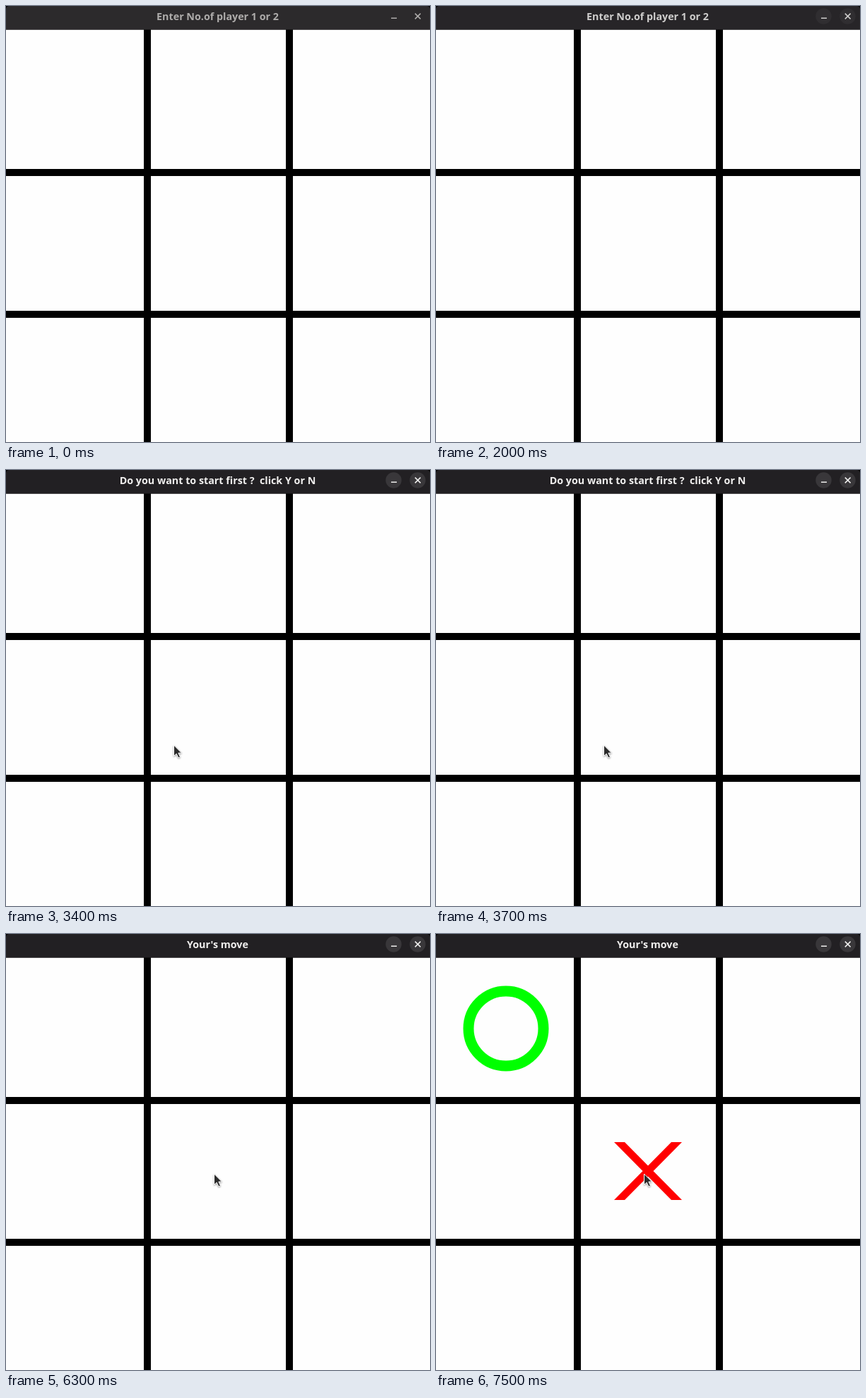
Write an HTML page that moves like this. It is 600 px wide and 618 px high and loops after 8000 ms.

```html
<!DOCTYPE html>
<html lang="en">
<head>
<meta charset="utf-8">
<title>Tic-tac-toe</title>
<style>
  html, body { margin: 0; width: 100%; height: 100%; overflow: hidden; background: #fefefe; }
  svg { display: block; width: 600px; height: 618px; }
  #title { font: bold 14.3px "Open Sans", sans-serif; text-anchor: middle; white-space: pre; }
  #arrow { filter: drop-shadow(.5px 1px 1px #0006); }
</style>
</head>
<body>
<svg viewBox="0 0 600 618">
  <rect width="600" height="618" fill="#fefefe"/>
  <path d="M200 33V618M401 33V618M0 236H600M0 437H600" stroke="#000" stroke-width="10"/>
  <rect width="600" height="33.5"/>
  <path id="bar" d="M0 33.5V5Q0 0 5 0H595Q600 0 600 5V33.5Z"/>
  <g id="discs" fill="#39373a">
    <circle cx="548.5" cy="14.5" r="11.2"/>
    <circle cx="582.5" cy="14.5" r="11.2"/>
  </g>
  <path id="icons" d="M545 17.3H553M578.8 10.6L586.6 18.4M586.6 10.6L578.8 18.4" stroke-width="1.5"/>
  <text id="title" x="299.5" y="20"></text>
  <circle id="nought" cx="99" cy="134" r="53" fill="none" stroke="#0f0" stroke-width="15"/>
  <path id="cross" d="M252 295H267L348 377H333ZM333 295H348L267 377H252Z" fill="#f00"/>
  <path id="arrow" d="M0 0V15.5L3.7 12.2L6.4 18L9 16.8L6.4 11.1H11Z" fill="#2b2b2b" stroke="#fff" stroke-width="1" stroke-linejoin="round"/>
</svg>
<script>
const LOOP = 8000;
const el = id => document.getElementById(id);
const show = (id, on) => el(id).setAttribute("visibility", on ? "visible" : "hidden");

// [start time, value]: each value holds until the next start
const titles = [
  [0, "Enter No.of player 1 or 2"],
  [3400, "Do you want to start first ?  click Y or N"],
  [5300, "Your's move"],
  [6800, "Computer move"],
  [7400, "Your's move"]
];
const pointer = [
  [0, null],
  [2500, [192, 372]], [2600, [208, 371]], [2700, [228, 383]], [2800, [237.5, 390]],
  [6100, [252, 376]], [6200, [282, 350]], [6300, [294.5, 340]]
];
const focus = [[0, 0], [2000, .5], [2100, 1]];

const at = (steps, t) => steps.findLast(([start]) => start <= t)[1];
const mix = (a, b, k) => `rgb(${a.map((v, i) => Math.round(v + (b[i] - v) * k))})`;

function draw(now) {
  const t = now % LOOP;
  const lit = at(focus, t);
  const ink = mix([174, 172, 171], [240, 239, 238], lit);
  el("bar").setAttribute("fill", mix([44, 42, 44], [34, 32, 35], lit));
  el("title").setAttribute("fill", ink);
  el("icons").setAttribute("stroke", ink);
  el("discs").setAttribute("opacity", lit);

  const text = at(titles, t);
  if (el("title").textContent !== text) el("title").textContent = text;

  const tip = at(pointer, t);
  show("arrow", tip);
  if (tip) el("arrow").setAttribute("transform", `translate(${tip})`);
  el("arrow").setAttribute("opacity", t < 2600 ? .75 : 1);

  show("cross", t >= 6800);
  show("nought", t >= 7400);
  requestAnimationFrame(() => draw(performance.now()));
}
draw(performance.now());
</script>
</body>
</html>
```
